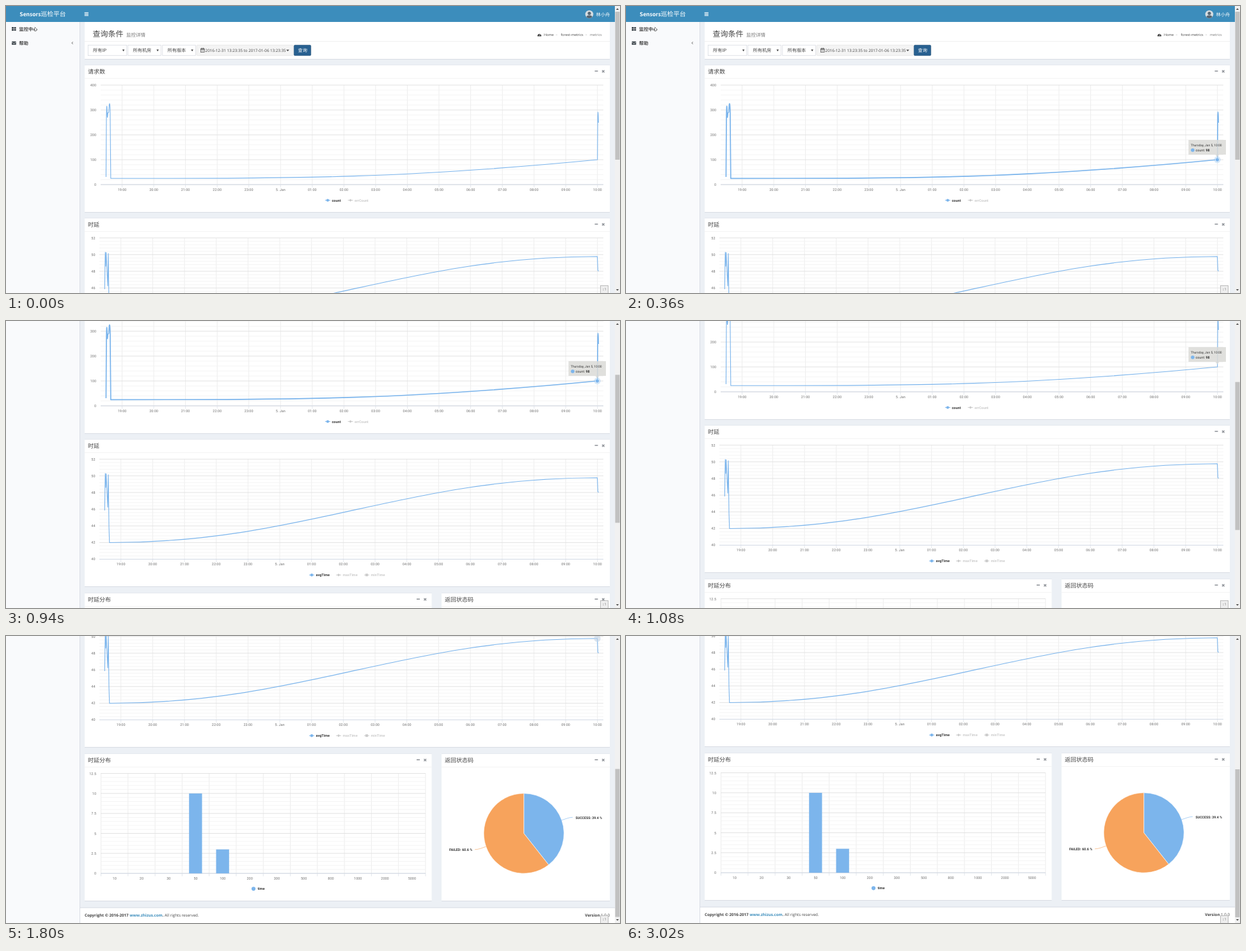
Animation of 960x450 px, one loop 3600 ms. Source, as an HTML page:

```html
<!DOCTYPE html>
<html lang="zh-CN">
<head>
<meta charset="utf-8">
<title>监控面板</title>
<style>
html, body { margin: 0; width: 960px; height: 450px; overflow: hidden; background: #ecf0f5; }
svg { display: block; }
text { font-family: "Open Sans", "Noto Sans CJK SC", "Noto Sans CJK", sans-serif; font-size: 6.2px; fill: #444; text-rendering: geometricPrecision; white-space: pre; }
.cn { font-family: "Noto Sans CJK SC", "Noto Sans CJK", "Open Sans", sans-serif; font-size: 7.2px; }
.ch { font-family: Roboto, sans-serif; font-size: 5.5px; fill: #707070; }
.dark { fill: #333; }
.off { fill: #ccc; }
.b { font-weight: 700; }
.m { text-anchor: middle; }
.e { text-anchor: end; }
.line { fill: none; stroke: #7cb5ec; stroke-width: 1.1; stroke-linejoin: round; }
</style>
</head>
<body>
<svg id="stage" width="960" height="450" viewBox="0 0 960 450" xmlns="http://www.w3.org/2000/svg"></svg>
<script>
const BLUE = '#7cb5ec', ORANGE = '#f7a35c', GREY = '#ccc';
const LOOP = 3600;
// start time, scroll offset, hovered chart, tooltip shown, fading halo
const STEPS = [
  { t: 0, y: 0 },
  { t: 360, y: 0, hover: 1, tip: 1 },
  { t: 720, y: 147, hover: 1, tip: 1 },
  { t: 1080, y: 169, tip: 1 },
  { t: 1440, y: 350, hover: 2, tip: 2 },
  { t: 1800, y: 389, fade: true },
  { t: 2160, y: 390 }
];

const rect = (x, y, w, h, fill, more = '') =>
  `<rect x="${x}" y="${y}" width="${w}" height="${h}" fill="${fill}" ${more}/>`;
const text = (x, y, s, cls = '', more = '') =>
  `<text x="${x}" y="${y}" class="${cls}" ${more}>${s}</text>`;
const path = (d, stroke, w = 1, more = '') =>
  `<path d="${d}" fill="none" stroke="${stroke}" stroke-width="${w}" ${more}/>`;
const shape = (d, fill) => `<path d="${d}" fill="${fill}"/>`;
const dot = (x, y, r, fill, more = '') => `<circle cx="${x}" cy="${y}" r="${r}" fill="${fill}" ${more}/>`;
const range = n => [...Array(n).keys()];

function card(x, y, w, h) {
  return rect(x, y, w, h, '#fff') +
    rect(x, y + h, w, 1, '#d9dde4') + rect(x, y - .5, w, .5, '#dce1e8');
}

function panel(x, y, w, title) {
  const r = x + w;
  return card(x, y, w, 230) +
    rect(x, y + 20, w, 1, '#f4f4f4') +
    text(x + 5, y + 12.8, title, 'cn', 'style="font-size:9px"') +
    rect(r - 23.5, y + 8.3, 5, 1.5, '#8c9096') +
    path(`M${r - 12} ${y + 7.7}l3.6 3.6m0 -3.6l-3.6 3.6`, '#8c9096', 1.3);
}

// horizontal grid with five minor steps per labelled one
function rows(x0, x1, top, step, labels, labelX) {
  const n = labels.length - 1;
  let s = '';
  range(n * 5 + 1).forEach(i => {
    const major = i % 5 === 0;
    s += path(`M${x0} ${top + i * step / 5}H${x1}`, major ? '#e2e2e2' : '#f1f1f1', major ? 1 : .8);
  });
  labels.forEach((l, i) => s += text(labelX, top + i * step + 2, l, 'ch e'));
  return s + path(`M${x0} ${top + n * step}H${x1}`, '#d3dae6', 1);
}

function columns(x, step, n, top, bottom) {
  return range(n).map(i =>
    path(`M${x + i * step} ${top}V${bottom}`, '#ededed', 1) +
    path(`M${x + i * step} ${bottom}v4.5`, '#dbe0e8', .8)).join('');
}

function hours(x, step, y) {
  return range(16).map(i => {
    const h = (19 + i) % 24;
    return text(x + i * step, y, h ? String(h).padStart(2, '0') + ':00' : '5. Jan', 'ch m');
  }).join('');
}

function key(x, y, kind, label, on) {
  const c = on ? BLUE : GREY;
  const mark = {
    circle: dot(x, y, 2.2, c),
    diamond: shape(`M${x} ${y - 2.2}l2.2 2.2l-2.2 2.2l-2.2 -2.2z`, c),
    square: rect(x - 2, y - 2, 4, 4, c)
  }[kind];
  return path(`M${x - 4} ${y}h8`, c, 1) + mark + text(x + 6.5, y + 2, label, 'ch b ' + (on ? 'dark' : 'off'));
}

function header() {
  const bars = [10.5, 12.7, 14.9].map(y => rect(122.7, y - .6, 6.2, 1.2, '#fff')).join('');
  return rect(0, 0, 952, 25, '#3c8dbc') +
    text(57.5, 16.2, '<tspan class="b" style="font-size:8.5px">Sensors</tspan>巡检平台', 'cn m', 'style="fill:#fff;font-size:9.8px"') +
    bars +
    dot(912, 13, 6.3, '#d5dde2') +
    dot(912, 11.4, 2.5, '#566673') +
    shape('M907.4 17.2Q908 14.4 912 14.4T916.6 17.2A6.3 6.3 0 0 1 907.4 17.2z', '#566673') +
    text(922.5, 15.6, '林小舟', 'cn', 'style="fill:#fff"');
}

function sidebar() {
  const tiles = [[9, 33], [12.6, 33], [9, 36.2], [12.6, 36.2]].map(p => rect(p[0], p[1], 3, 2.6, '#3f474d')).join('');
  return tiles + text(20.5, 38.7, '监控中心', 'cn b') +
    rect(9, 55.4, 6.8, 5.4, '#3f474d', 'rx=".6"') + path('M9 56.8l3.4 2.2l3.4 -2.2', '#f9fafc', .7) +
    text(20.5, 60.8, '帮助', 'cn b') +
    path('M104.6 56.2l-1.8 1.8l1.8 1.8', '#444', .8);
}

function select(x, w, label) {
  return rect(x + .25, 61.25, w, 16.5, '#fff', 'stroke="#d2d6de" stroke-width=".7"') +
    text(x + 8, 72.2, label, 'cn') + shape(`M${x + w - 6.7} 68.2h3.6l-1.8 3z`, '#444');
}

function query() {
  const small = 'style="font-size:5.4px"';
  return card(123, 25, 821, 58) + rect(123, 55, 821, 1, '#f0f0f0') +
    text(135.5, 48.2, '查询条件', 'cn', 'style="font-size:12px"') +
    text(188, 48, '监控详情', 'cn', 'style="font-size:7.5px;fill:#777"') +
    shape('M831 47.6A3.1 3.1 0 1 1 837 47.6z', '#444') + path('M834 46.6l1.1 -2.6', '#fff', .6) +
    text(841, 47.2, 'Home', '', small) +
    text(859.5, 47, '&gt;', '', 'style="font-size:5px;fill:#bbb"') +
    text(867.5, 47.2, 'forest-metrics', '', small) +
    text(905.7, 47, '&gt;', '', 'style="font-size:5px;fill:#bbb"') +
    text(913, 47.2, 'metrics', '', 'style="font-size:5.4px;fill:#777"') +
    select(128, 60.5, '所有IP') + select(190.5, 51.5, '所有机房') + select(244.5, 51.5, '所有版本') +
    rect(298, 61.25, 151, 16.5, '#f4f4f4', 'rx="1.5" stroke="#ddd" stroke-width=".6"') +
    rect(304.6, 67, 5.6, 5.4, '#fff', 'stroke="#444" stroke-width=".7"') +
    path('M304.6 68h5.6M306.2 65.6v2M308.6 65.6v2', '#444', 1) +
    path('M304.6 70.4h5.6M306.4 68.5v4M308.4 68.5v4', '#777', .4) +
    text(311.6, 72, '2016-12-31 13:23:35 to 2017-01-06 13:23:35') +
    shape('M438.2 68.4h4.6l-2.3 2.6z', '#444') +
    rect(450.3, 61.3, 26.4, 16.4, '#286090', 'rx="1.5" stroke="#204d74" stroke-width=".6"') +
    text(456.5, 72.2, '查询', 'cn', 'style="fill:#fff"');
}

function requests() {
  return panel(123, 93, 821, '请求数') +
    columns(181.5, 49.55, 16, 124, 280) +
    rows(148, 934, 124, 39, [400, 300, 200, 100, 0], 141) +
    hours(181.5, 49.55, 289.8) +
    '<path id="s1" class="line" d="M156.4 268L157 175Q157.5 142 158.2 170Q158.6 180 159.2 168L160.6 166.5L161.4 155Q162.2 149 162.8 162L163.8 270.3' +
    'C468.3 270.3 620.5 270.3 924.7 241L925.2 172Q925.6 160 926 172L926.3 183"/>' +
    key(503, 304.6, 'circle', 'count', true) + key(538.5, 304.6, 'diamond', 'errCount');
}

function delay() {
  return panel(123, 333, 821, '时延') +
    columns(179.7, 49.67, 16, 363.7, 520.5) +
    rows(146, 934, 363.7, 26.13, [52, 50, 48, 46, 44, 42, 40], 139.5) +
    hours(179.7, 49.67, 530) +
    '<path id="s2" class="line" d="M154.3 444L155.2 386L155.9 408L156.6 386.5L157.8 413L159 439L160 388L161 470L161.8 494.5' +
    'C466.8 494.5 619.4 392.8 924.5 392.8L925.4 414L926.3 416"/>' +
    key(478, 545.2, 'circle', 'avgTime', true) + key(520, 545.2, 'diamond', 'maxTime') + key(564, 545.2, 'square', 'minTime');
}

function spread() {
  const step = 42.29, base = 761.2, unit = 12.53;
  const names = [10, 20, 30, 50, 100, 200, 300, 500, 800, 1000, 2000, 5000];
  const bar = (i, v) => rect(148.5 + step * (i + .5) - 10.3, base - v * unit, 20.3, v * unit, BLUE);
  return panel(123, 574, 542.5, '时延分布') +
    columns(148.5, step, 13, 604.5, base) +
    rows(148, 656, 604.5, 31.34, [12.5, 10, 7.5, 5, 2.5, 0], 141) +
    names.map((n, i) => text(148.5 + step * (i + .5), 770.6, n, 'ch m')).join('') +
    bar(3, 10) + bar(4, 3) +
    dot(387, 785.3, 3.1, BLUE) + text(393.5, 787.3, 'time', 'ch b dark');
}

function codes() {
  const cx = 809.7, cy = 698.5, r = 62.7, a = .394 * 2 * Math.PI;
  const end = `${cx + r * Math.sin(a)} ${cy - r * Math.cos(a)}`, top = `${cx} ${cy - r}`;
  const slice = (from, to, big, fill) =>
    `<path d="M${cx} ${cy}L${from}A${r} ${r} 0 ${big} 1 ${to}z" fill="${fill}" stroke="#fff" stroke-width=".6"/>`;
  return panel(681, 574, 263, '返回状态码') +
    slice(top, end, 0, BLUE) + slice(end, top, 1, ORANGE) +
    path('M886 673.3Q882 673.3 877 675L868.8 677.8', BLUE, .6) +
    path('M733 723.8Q737 723.8 742 722.2L750.4 719.2', ORANGE, .6) +
    text(890.5, 675.6, 'SUCCESS: 39.4 %', 'ch b dark', 'style="font-size:5.25px"') +
    text(693, 726, 'FAILED: 60.6 %', 'ch b dark', 'style="font-size:5.4px"');
}

function footer() {
  return rect(116, 815, 836, 25, '#fff') + rect(116, 814.5, 836, 1, '#d8dce3') +
    text(123, 829.3, '<tspan class="b">Copyright © 2016-2017 <tspan fill="#3c8dbc">www.zhizus.com</tspan>.</tspan> All rights reserved.') +
    text(944, 829.3, '<tspan class="b">Version</tspan> 1.0.0', 'e');
}

function halo(id, y) {
  return `<g id="${id}">` + dot(924.5, y, 5.2, BLUE, 'opacity=".3"') +
    dot(924.5, y, 3.1, BLUE, 'stroke="#fff" stroke-width=".6"') + '</g>';
}

function tip(id, x, y, w, h, body) {
  const d = `M${x} ${y}h${w}v${h}H927.5l-3 4l-3 -4H${x}z`;
  return `<g id="${id}"><path d="${d}" fill="#dbdbd8" fill-opacity=".86"/>${body}</g>`;
}

const get = id => document.getElementById(id);
const show = (id, on) => get(id).setAttribute('visibility', on ? 'visible' : 'hidden');

get('stage').innerHTML =
  rect(0, 0, 960, 450, '#ecf0f5') + rect(0, 0, 115, 450, '#f9fafc') + rect(115, 0, 1, 450, '#d9dde4') +
  '<g id="page">' + sidebar() + query() + requests() + delay() + spread() + codes() + footer() + header() +
  halo('h1', 241) + halo('h2', 392.9) +
  dot(924.5, 393, 5.2, '#c3d3e6', 'id="fade" opacity=".6"') +
  tip('t1', 879.5, 210, 58.5, 23,
    text(883, 220, 'Thursday, Jan 5, 10:00', 'ch dark', 'style="font-size:4.9px"') + dot(886, 226, 2.8, BLUE) +
    text(890.5, 228, 'count: <tspan class="b">98</tspan>', 'ch dark', 'style="font-size:5.3px"')) +
  tip('t2', 896, 370, 42, 15,
    text(899.5, 380, 'avgTime: <tspan class="b">49.74</tspan>', 'ch dark', 'style="font-size:5.3px"')) +
  '</g>' +
  rect(952, 0, 8, 450, '#f1f1f1') + rect(952.5, 9, 7, 232, '#c1c1c1', 'id="thumb"') +
  shape('M953.8 6l2.2 -2.6l2.2 2.6z', '#505050') + shape('M953.8 444l2.2 2.6l2.2 -2.6z', '#505050') +
  rect(929.5, 438.5, 12, 12, '#eee', 'stroke="#bbb" stroke-width="1"') +
  text(935.5, 446.3, '::1', 'm', 'style="font-size:5.5px;fill:#777"');

function draw(ms) {
  const s = STEPS.filter(p => p.t <= ms).pop();
  get('page').setAttribute('transform', `translate(0 ${-s.y})`);
  get('thumb').setAttribute('y', 9 + s.y * 200 / 390);
  for (const i of [1, 2]) {
    get('s' + i).style.strokeWidth = s.hover === i ? 1.7 : 1.1;
    show('h' + i, s.hover === i);
    show('t' + i, s.tip === i);
  }
  show('fade', s.fade);
}

const start = performance.now();
function tick() {
  draw((performance.now() - start) % LOOP);
  requestAnimationFrame(tick);
}
tick();
</script>
</body>
</html>
```
